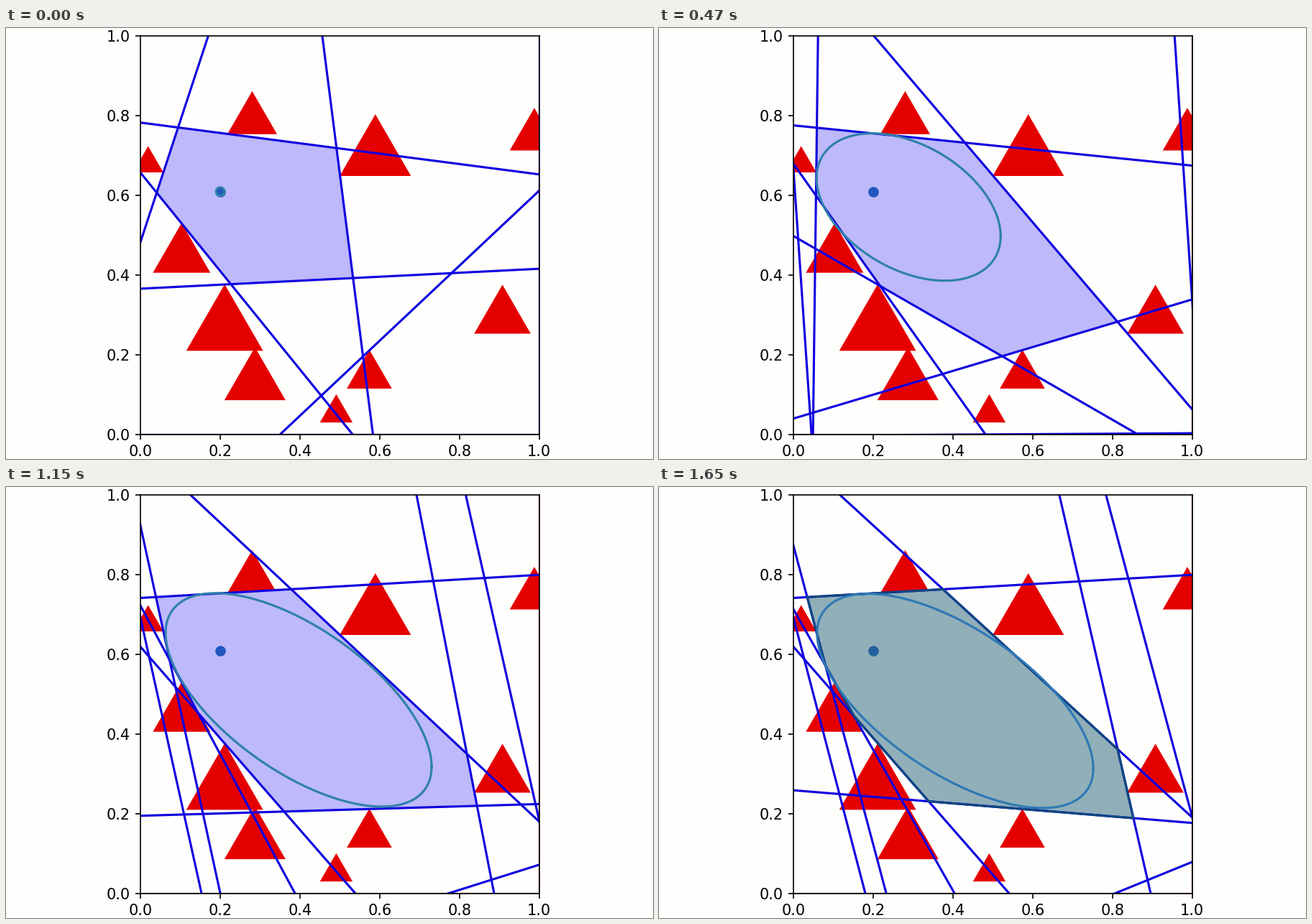
These frames come from a looping animation (900x600 px, 1950 ms). A matplotlib script:

```python
import numpy as np
import matplotlib.pyplot as plt
from matplotlib.animation import FuncAnimation
from matplotlib.patches import Polygon

W, H, DPI = 900, 600, 150
STEP = 50                                  # ms per tick
HOLDS = [200, 450, 500, 500, 300]          # ms each stage stays
STARTS = np.cumsum([0] + HOLDS[:-1])
TICKS = sum(HOLDS) // STEP

PAPER = "#fefffc"
RED = "#e50000"
RIM = "#a80000"
BLUE = "#1000e0"
SEED = np.array([0.2, 0.61])

# Obstacles: apex x, apex y, height (equilateral)
TRIANGLES = [
    (0.280, 0.862, 0.108), (0.589, 0.804, 0.155), (0.988, 0.820, 0.107),
    (0.019, 0.724, 0.066), (0.103, 0.531, 0.125), (0.211, 0.377, 0.167),
    (0.287, 0.219, 0.133), (0.574, 0.213, 0.098), (0.491, 0.101, 0.071),
    (0.908, 0.376, 0.123),
]

# Cutting lines: the two box sides they meet (l, r, t, b) and where
CUTS = [
    [("lt", .484, .1695), ("tb", .456, .583), ("lr", .783, .653),
     ("lb", .657, .532), ("lr", .366, .416), ("br", .350, .612),
     ("lr", 0, 0), ("tb", 1, 1)],
    [("tb", .0613, .0487), ("tr", .202, .063), ("lr", .776, .675),
     ("lb", .679, .4815), ("lb", .498, .864), ("lr", .040, .339),
     ("lb", .660, .045), ("tr", .956, .339), ("lr", -.003, .003)],
    [("lb", .895, .2165), ("lb", .720, .393), ("lb", .695, .157),
     ("lb", .619, .539), ("tr", .150, .152), ("tb", .671, .8945),
     ("tr", .8115, .164), ("lr", .753, .756), ("lr", .147, .260),
     ("br", .766, .088)],
    [("lb", .922, .200), ("lb", .722, .3875), ("lb", .691, .153),
     ("lb", .619, .539), ("tr", .126, .1805), ("tb", .6925, .887),
     ("tr", .816, .184), ("lr", .742, .800), ("lr", .195, .2245),
     ("br", .772, .072)],
    [("lb", .872, .2326), ("lb", .713, .404), ("lb", .691, .180),
     ("lb", .619, .541), ("tr", .117, .191), ("tb", .667, .896),
     ("tr", .784, .193), ("lr", .742, .800), ("lr", .259, .177),
     ("br", .806, .079)],
]

# Inscribed ellipses: centre x, centre y, half width, half height, correlation
ELLIPSES = [
    (0.2, 0.61, 0.0105, 0.0105, 0),
    (0.2886, 0.571, 0.231, 0.185, -0.395),
    (0.383, 0.4925, 0.3256, 0.266, -0.645),
    (0.3965, 0.486, 0.3337, 0.268, -0.625),
    (0.4055, 0.4835, 0.3465, 0.269, -0.63),
]


def on_side(side, v):
    return np.array({"l": (0, v), "r": (1, v), "t": (v, 1), "b": (v, 0)}[side],
                    dtype=float)


def ends(cut):
    sides, u, v = cut
    return on_side(sides[0], u), on_side(sides[1], v)


def clip(poly, p, q):
    """Keep the part of poly on the seed's side of the line pq."""
    n = np.array([p[1] - q[1], q[0] - p[0]])
    if n @ (SEED - p) < 0:
        n = -n
    out = []
    for a, b in zip(poly, poly[1:] + poly[:1]):
        da, db = n @ (a - p), n @ (b - p)
        if da >= 0:
            out.append(a)
        if da * db < 0:
            out.append(a + (b - a) * da / (da - db))
    return out


def region(cuts):
    poly = [np.array(c, dtype=float) for c in ((0, 0), (1, 0), (1, 1), (0, 1))]
    for cut in cuts:
        poly = clip(poly, *ends(cut))
    return np.array(poly)


def ellipse(cx, cy, a, b, rho):
    t = np.linspace(0, 2 * np.pi, 241)
    return cx + a * np.cos(t), cy + b * np.cos(t - np.arccos(rho))


fig = plt.figure(figsize=(W / DPI, H / DPI), dpi=DPI, facecolor=PAPER)
ax = fig.add_axes([187.2 / W, 34.2 / H, 554.4 / W, 554.4 / H], facecolor=PAPER)
ax.set(xlim=(0, 1), ylim=(0, 1))

for x, y, h in TRIANGLES:
    half = h / np.sqrt(3)
    ax.add_patch(Polygon([(x, y), (x - half, y - h), (x + half, y - h)],
                         fc=RED, lw=0, zorder=1))

ax.plot([0, 1], [0, 0], color=RIM, lw=1.5, zorder=1.2)
ax.plot([1, 1], [0, 1], color=RIM, lw=1.5, zorder=1.2)

area = ax.add_patch(Polygon([(0, 0), (0, 1), (1, 0)], lw=0, zorder=1.5))
outline = ax.add_patch(Polygon([(0, 0), (0, 1), (1, 0)], fill=False,
                               ec="#0f477f", lw=1.5, zorder=2.1))
lines = [ax.plot([], [], color=BLUE, lw=1.5, zorder=2)[0]
         for _ in range(max(map(len, CUTS)))]
dot, = ax.plot(*SEED, "o", ms=6, zorder=2.2)
ring, = ax.plot([], [], lw=1.5, zorder=2.3)

REGIONS = [region(c) for c in CUTS]


def draw(tick):
    k = np.searchsorted(STARTS, tick * STEP, side="right") - 1
    final = k == len(HOLDS) - 1
    for i, line in enumerate(lines):
        if i < len(CUTS[k]):
            p, q = ends(CUTS[k][i])
            d = 0.3 * (q - p)
            line.set_data(*zip(p - d, q + d))
        else:
            line.set_data([], [])
    area.set_xy(REGIONS[k])
    area.set_facecolor("#90afb9" if final else "#bdb9fa")
    outline.set_xy(REGIONS[k])
    outline.set_visible(final)
    dot.set_color("#23609c" if final else "#2256bf")
    ring.set_data(*ellipse(*ELLIPSES[k]))
    ring.set_color("#2e78b4" if final else "#2f80ab")
    return [area, outline, dot, ring, *lines]


anim = FuncAnimation(fig, draw, frames=TICKS, interval=STEP,
                     init_func=lambda: draw(0), repeat=True, repeat_delay=0)
plt.show()
```
